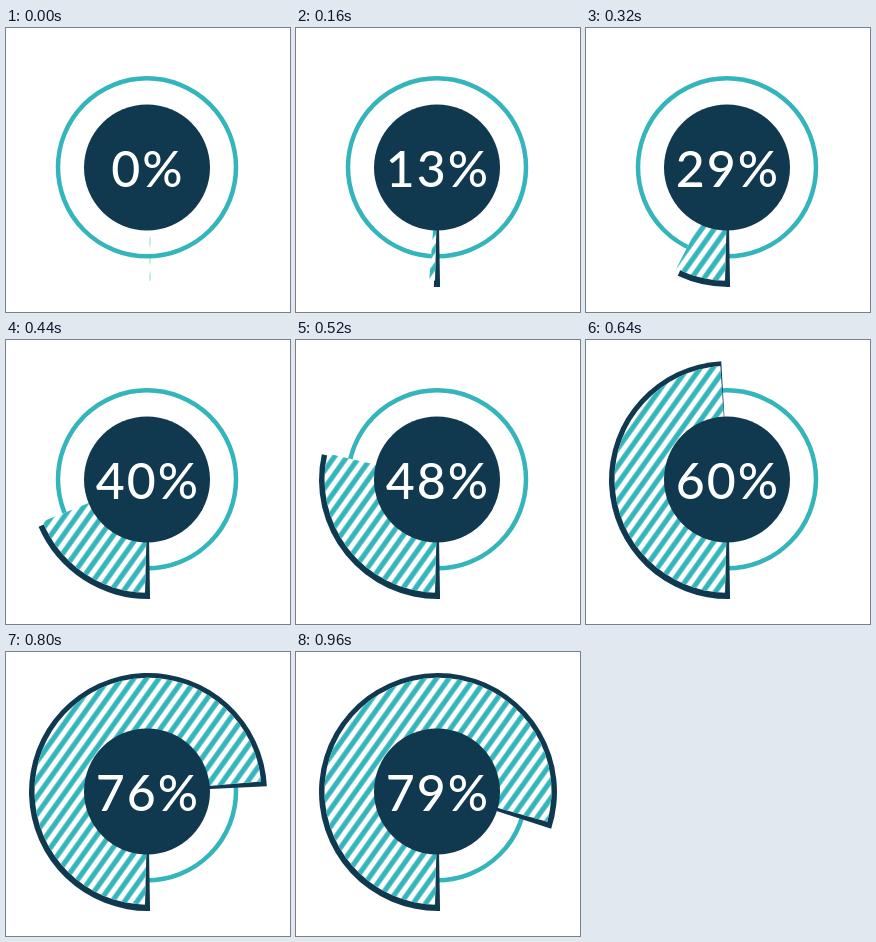
An HTML page for the animation above (1080 ms loop, 284 px wide and 284 px high).

```html
<!DOCTYPE html>
<html lang="en">
<head>
<meta charset="utf-8">
<title>Percentage dial</title>
<style>
  html, body { margin: 0; height: 100%; overflow: hidden; background: #fff; }
  svg { display: block; width: 100vw; height: 100vh; }
  text { font: 500 50px Lato, sans-serif; letter-spacing: 2px; fill: #fff; text-anchor: middle; }
</style>
</head>
<body>
<svg viewBox="0 0 284 284">
  <defs>
    <pattern id="stripes" width="10.17" height="20" patternUnits="userSpaceOnUse"
             patternTransform="translate(140 219.5) rotate(35.54)">
      <path d="M0 0h2.55v20H0zM7.62 0h2.55v20H7.62z" fill="#34b5bc"/>
    </pattern>
  </defs>
  <circle cx="141" cy="139.3" r="89" fill="none" stroke="#34b5bc" stroke-width="4.5"/>
  <path id="rim" fill="#10384f"/>
  <path id="back" fill="#fff"/>
  <path id="hatch" fill="url(#stripes)"/>
  <path id="sliver" d="M144 202v51" stroke="url(#stripes)" opacity=".55"/>
  <circle cx="141" cy="139.5" r="63" fill="#10384f"/>
  <text id="label" x="142" y="158.5"></text>
</svg>
<script>
const LOOP = 1080, STEP = 40, SWEEP_END = 960;
const knots = [[0, 0], [160, .0104], [320, .09], [520, .358], [640, .615], [800, .928], [960, 1]];
const $ = id => document.getElementById(id);

function slope(i) {
  if (i === 0 || i === knots.length - 1) return 0;
  const [a, b] = [knots[i - 1], knots[i + 1]];
  return (b[1] - a[1]) / (b[0] - a[0]);
}

// Smooth Hermite curve through the knots
function sweep(t) {
  if (t >= SWEEP_END) return 1;
  const i = knots.findIndex(k => k[0] > t) - 1;
  const [t0, a] = knots[i], [t1, b] = knots[i + 1];
  const d = t1 - t0, u = (t - t0) / d, v = 1 - u;
  return a * (1 + 2 * u) * v * v + b * u * u * (3 - 2 * u)
    + d * u * v * (slope(i) * v - slope(i + 1) * u);
}

// Angles in degrees, clockwise from straight down
function sector(cx, cy, r, from, to) {
  const point = deg => {
    const a = deg * Math.PI / 180;
    return `${cx - r * Math.sin(a)} ${cy + r * Math.cos(a)}`;
  };
  return `M${cx} ${cy}L${point(from)}A${r} ${r} 0 ${+(to - from > 180)} 1 ${point(to)}Z`;
}

function draw(now) {
  const t = Math.floor(now % LOOP / STEP) * STEP;
  const p = sweep(t);
  const fill = p ? sector(142, 139.3, 113.5, 1.5, 1.5 + 284 * p) : "";
  $("rim").setAttribute("d", p ? sector(142, 140, 119, -1, -1 + 289 * p) : "");
  $("back").setAttribute("d", fill);
  $("hatch").setAttribute("d", fill);
  $("sliver").style.display = p ? "none" : "";
  const value = Math.floor(.0985 * t - 2.5);
  $("label").textContent = Math.min(79, Math.max(0, value)) + "%";
}

const start = performance.now();
function tick() {
  draw(performance.now() - start);
  requestAnimationFrame(tick);
}
tick();
</script>
</body>
</html>
```
